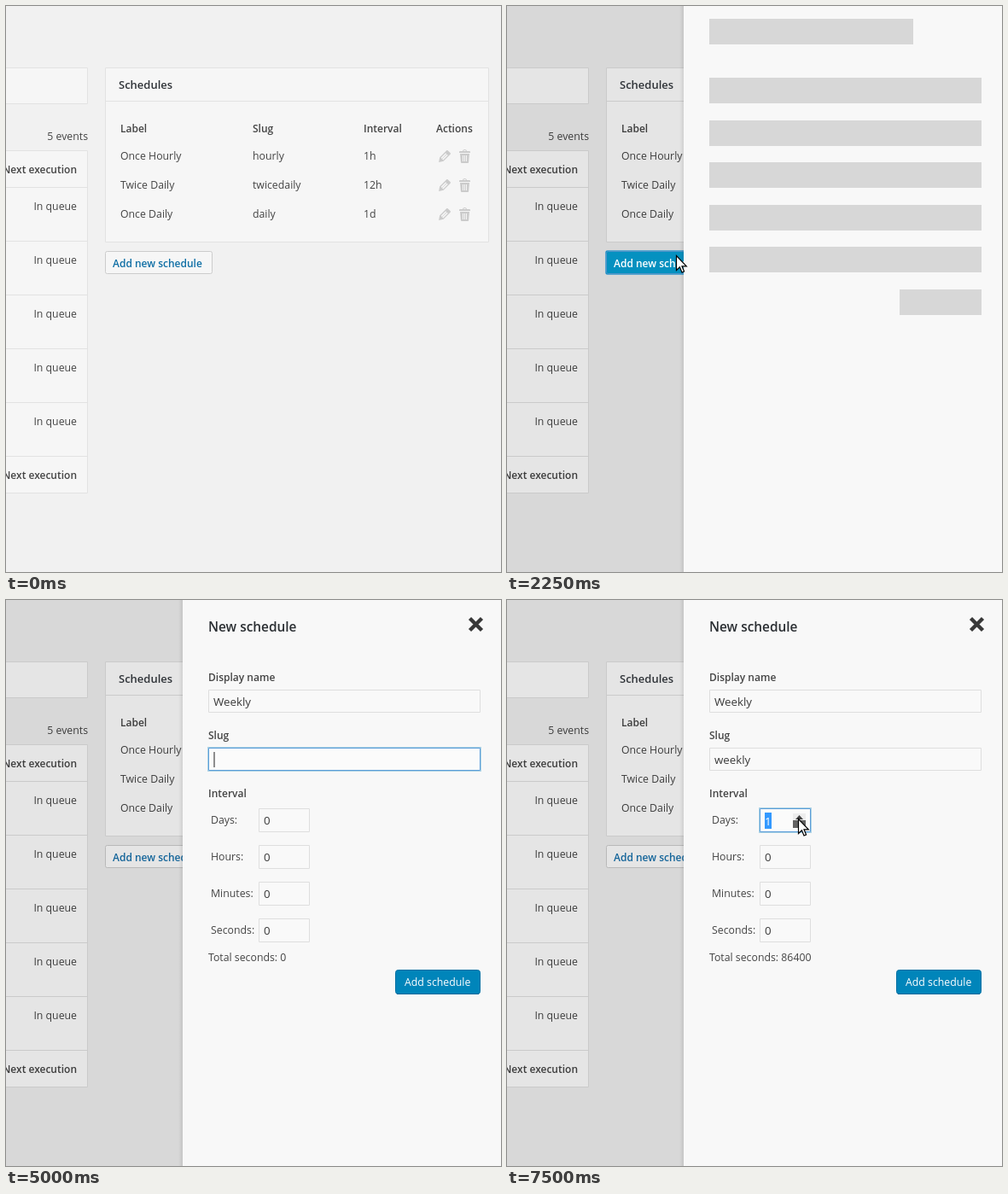
These frames come from a looping animation (580x663 px, 8000 ms). An HTML page with a canvas:

```html
<!DOCTYPE html>
<html lang="en">
<head>
<meta charset="utf-8">
<title>New schedule</title>
<style>
html, body { margin: 0; width: 100%; height: 100%; overflow: hidden; background: #f1f1f1; }
canvas { display: block; width: 580px; height: 663px; }
</style>
</head>
<body>
<canvas id="stage" width="580" height="663"></canvas>
<script>
const ctx = document.getElementById('stage').getContext('2d');
const W = 580, H = 663, LOOP = 8000, STEP = 250;
const SLIDE = { start: 1750, length: 443, end: 207 };

const body = '12.3px "Open Sans", "Noto Sans", sans-serif';
const strong = '600 12px "Open Sans", "Noto Sans", sans-serif';
const heading = '600 13px "Open Sans", "Noto Sans", sans-serif';
const title = '600 15.4px "Open Sans", "Noto Sans", sans-serif';
const field = '13.3px "Open Sans", "Noto Sans", sans-serif';
const menu = 'bold 12px "Liberation Sans", Arial, sans-serif';

const themes = {
  open: { bg: '#f1f1f1', card: '#f6f6f6', line: '#e2e2e2', text: '#444', icon: '#cbcbcb',
          link: '#0f6fa5', edge: '#cccccc', hover: '#00a0d2' },
  fading: { bg: '#ebebeb', card: '#fafafa', line: '#dadada', text: '#424242', icon: '#c6c6c6',
            link: '#0f6fa5', edge: '#c6c6c6', hover: '#049bd0' },
  dim: { bg: '#d8d8d8', card: '#e5e5e5', line: '#cacaca', text: '#3c3c3c', icon: '#b5b5b5',
         link: '#14659a', edge: '#b9b9b9', hover: '#0591c0' }
};

const pencil = new Path2D('M13.9 3.4l2.7 2.7c.5.5.4 1.2 0 1.6l-8 8-5.5 1.2 1.1-5.6 8-8c.4-.4 1.2-.4 1.7.1zM11.2 6.2l-5.6 5.6 1.1 1.1 5.5-5.6zM8.2 14.4l5.6-5.6-1.1-1.1-5.6 5.6z');
const bin = new Path2D('M12 4h3q1 0 1 1v1H3V5q0-1 1-1h3c.2-1.1 1.3-2 2.5-2s2.3.9 2.5 2zM8 4h3c-.2-.6-.9-1-1.5-1S8.2 3.4 8 4zM4 7h11l-.9 10q0 1-1 1H5.9q-1 0-1-1z');
const arrow = new Path2D('M.5.5V17.5L4.4 13.8 7 20 9.6 18.9 7 12.8H12.3Z');

const clamp = v => Math.max(0, Math.min(1, v));
const easeOut = u => 1 - (1 - u) ** 2;
const between = (t, a, b) => t >= a && t < b;

function rect(x, y, w, h, color) {
  ctx.fillStyle = color;
  ctx.fillRect(x, y, w, h);
}

function box(x, y, w, h, fill, edge, radius = 0) {
  ctx.beginPath();
  ctx.roundRect(x + .5, y + .5, w - 1, h - 1, radius);
  ctx.fillStyle = fill;
  ctx.fill();
  ctx.lineWidth = 1;
  ctx.strokeStyle = edge;
  ctx.stroke();
}

function glowBox(x, y, w, h, fill, edge, glow, radius) {
  box(x - 1, y - 1, w + 2, h + 2, fill, glow, radius);
  box(x, y, w, h, fill, edge, radius);
}

function text(str, x, y, font, color, align = 'left') {
  ctx.font = font;
  ctx.fillStyle = color;
  ctx.textAlign = align;
  ctx.fillText(str, x, y);
}

function icon(path, x, y, color) {
  ctx.save();
  ctx.translate(x, y);
  ctx.fillStyle = color;
  ctx.fill(path, 'evenodd');
  ctx.restore();
}

function cursor(x, y) {
  ctx.save();
  ctx.translate(x, y);
  ctx.fillStyle = '#fff';
  ctx.fill(arrow);
  ctx.lineWidth = 1.2;
  ctx.strokeStyle = '#000';
  ctx.stroke(arrow);
  ctx.restore();
}

function events(c) {
  box(-10, 72, 106, 43, c.card, c.line);
  text('5 events', 96, 157, body, c.text, 'right');
  box(-10, 169, 106, 402, c.card, c.line);
  for (let i = 0; i < 6; i++) {
    rect(0, 212 + i * 63, 95, 1, c.line);
    if (i < 5) text('In queue', 83, 239 + i * 63, body, c.text, 'right');
  }
  for (const y of [196, 554]) text('Next execution', 83, y, strong, c.text, 'right');
}

function schedules(c) {
  const cols = [134, 289, 419];
  box(116, 72, 450, 205, c.card, c.line);
  rect(117, 111, 448, 1, c.line);
  text('Schedules', 132, 97, heading, '#2f3338');
  ['Label', 'Slug', 'Interval'].forEach((s, i) => text(s, cols[i], 148, strong, c.text));
  text('Actions', 504, 148, strong, c.text);
  [['Once Hourly', 'hourly', '1h'], ['Twice Daily', 'twicedaily', '12h'], ['Once Daily', 'daily', '1d']]
    .forEach((row, r) => {
      const y = 180 + r * 34;
      row.forEach((s, i) => text(s, cols[i], y, body, c.text));
      icon(pencil, 504, y - 14, c.icon);
      icon(bin, 528, y - 14, c.icon);
      for (const dx of [7, 9, 11]) rect(528 + dx, y - 5, 1, 7, c.card);
    });
}

function addButton(t, c) {
  const hover = between(t, 1250, 2500);
  const focus = between(t, 1750, 3000);
  const fill = hover ? c.hover : c.card;
  const edge = focus ? '#4f95c8' : hover ? '#008ec2' : c.edge;
  if (focus) glowBox(116, 287, 126, 27, fill, edge, 'rgba(60,150,210,.45)', 2);
  else box(116, 287, 126, 27, fill, edge, 2);
  text('Add new schedule', 125, 306, strong, hover ? '#fff' : focus ? '#2b4f68' : c.link);
}

function input(x, y, w, h, value, focus) {
  if (focus) glowBox(x, y, w, h, '#fbfbfb', '#5b9dd9', 'rgba(30,140,190,.35)');
  else box(x, y, w, h, '#f9f9f9', '#dedede');
  text(value, x + 6, y + 19, field, '#3a3a3a');
}

function caret(x, y, value) {
  ctx.font = field;
  rect(Math.round(x + 6 + ctx.measureText(value).width) + .5, y + 5, 1, 18, '#222');
}

// Letters appear two per step, after a first key at `start`.
function typed(word, t, start, first) {
  return t < start ? '' : word.slice(0, first + Math.floor((t - start) / STEP) * 2);
}

function suggestions() {
  box(237, 132, 319, 50, '#fdfdfd', '#dcdcdc');
  ['Weekly', 'Weeklu'].forEach((s, i) => text(s, 246, 149 + i * 24, menu, '#000'));
}

function spinner() {
  rect(335, 250, 15, 17, '#ededed');
  rect(335, 258, 15, 9, '#636363');
  ctx.fillStyle = '#444';
  ctx.beginPath();
  ctx.moveTo(338, 257);
  ctx.lineTo(342.5, 252);
  ctx.lineTo(347, 257);
  ctx.fill();
}

function interval(t) {
  const set = t >= 7000;
  ['Days:', 'Hours:', 'Minutes:', 'Seconds:'].forEach((s, i) => {
    const y = 244 + i * 43;
    text(s, 240, y + 18, body, '#444');
    input(296, y, 60, 28, i === 0 && set ? '' : '0', i === 0 && set);
  });
  if (set) {
    rect(302, 249, 8, 19, '#3399ff');
    text('1', 302, 264, field, '#fff');
  }
  if (t >= 6500) spinner();
  text('Total seconds: ' + (set ? 86400 : 0), 237, 423, body, '#444');
}

function form(t) {
  const name = typed('Weekly', t, 3750, 1 + (t >= 4250));
  const slug = typed('weekly', t, 5250, 3 + (t >= 5500));
  const nameFocus = between(t, 3000, 5000);
  const slugFocus = between(t, 5000, 5750);

  text('New schedule', 237, 37, title, '#2b2f33');
  ctx.strokeStyle = '#383838';
  ctx.lineWidth = 4.4;
  ctx.beginPath();
  ctx.moveTo(543.5, 21.5);
  ctx.lineTo(557.5, 35.5);
  ctx.moveTo(557.5, 21.5);
  ctx.lineTo(543.5, 35.5);
  ctx.stroke();

  text('Display name', 237, 95, strong, '#444');
  text('Slug', 237, 163, strong, '#444');
  text('Interval', 237, 231, strong, '#444');
  input(237, 173, 319, 27, slug, slugFocus);
  input(237, 105, 319, 27, name, nameFocus);
  if (between(t, 2750, 3000)) rect(304, 120, 32, 10, '#fff');
  if (between(t, 3750, 4500)) suggestions();
  if (nameFocus && !between(t, 3500, 3750)) caret(237, 105, name);
  if (slugFocus) caret(237, 173, slug);

  interval(t);
  box(456, 433, 100, 29, '#0085ba', '#006fa3', 3);
  rect(458, 461, 96, 1, '#006799');
  text('Add schedule', 467, 452, body, '#fff');
}

function skeleton(x) {
  const gray = '#d7d7d7';
  rect(x + 30, 15, 239, 30, gray);
  for (let i = 0; i < 5; i++) rect(x + 30, Math.round(84 + i * 49.5), 319, 30, gray);
  rect(x + 253, 332, 96, 30, gray);
}

function panel(t) {
  const p = easeOut(clamp((t - SLIDE.start) / SLIDE.length));
  const x = Math.round(W + (SLIDE.end - W) * p);
  const shade = ctx.createLinearGradient(x - 5, 0, x, 0);
  shade.addColorStop(0, 'rgba(0,0,0,0)');
  shade.addColorStop(1, 'rgba(0,0,0,.09)');
  rect(x - 5, 0, 5, H, shade);
  rect(x, 0, W - x, H, '#f8f8f8');
  if (t < 2500) skeleton(x);
  else form(t);
}

function pointer(t) {
  if (between(t, 1000, 2500)) {
    const u = clamp((t - 1000) / 250);
    cursor(205 - 7 * u, 365 - 73 * u);
  } else if (t >= 6000) {
    const u = easeOut(clamp((t - 6000) / 500));
    cursor(Math.round(349 - 8 * u), Math.round(203 + 53 * u));
  }
}

function draw(now) {
  const t = Math.floor((now % LOOP) / STEP) * STEP;
  const c = t < 1750 ? themes.open : t < 2000 ? themes.fading : themes.dim;
  rect(0, 0, W, H, c.bg);
  events(c);
  schedules(c);
  addButton(t, c);
  if (t >= SLIDE.start) panel(t);
  pointer(t);
}

let start;
function tick(now) {
  start ??= now;
  draw(now - start);
  requestAnimationFrame(tick);
}
draw(0);
requestAnimationFrame(tick);
</script>
</body>
</html>
```
